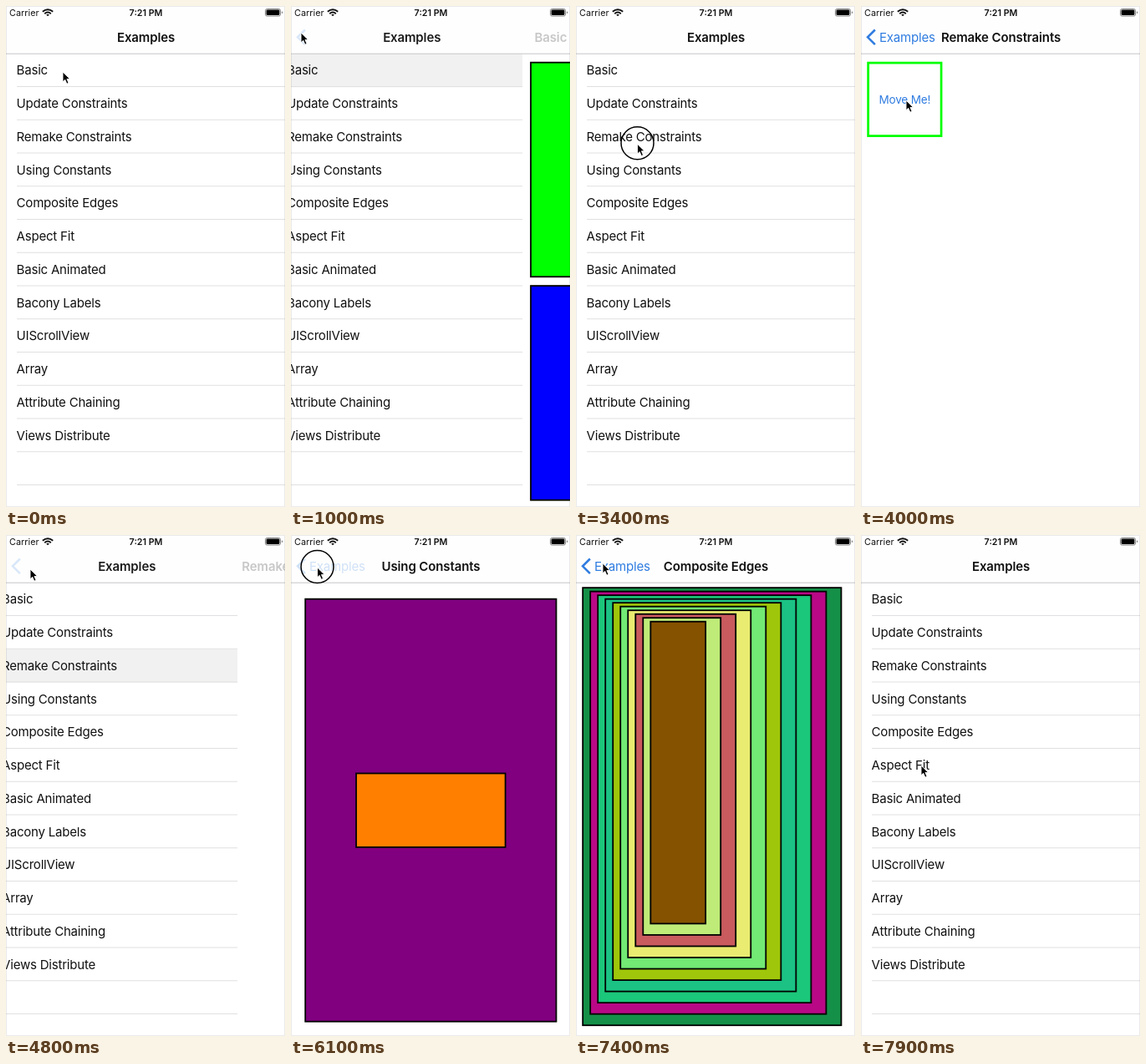
Recreate the animation shown at these times as an HTML page. Size 334 by 600 pixels, loop 8 s.

```html
<!DOCTYPE html>
<html lang="en">
<head>
<meta charset="utf-8">
<title>Examples</title>
<style>
  html, body { margin: 0; width: 100%; height: 100%; overflow: hidden; background: #fff; }
  svg { display: block; width: 334px; height: 600px; }
  text { font: 15px Inter, Roboto, sans-serif; letter-spacing: -.2px; fill: #111; }
  .title { font-weight: 600; letter-spacing: -.12px; }
  .status { font-size: 10.7px; letter-spacing: .1px; }
  .time { font-weight: 600; text-anchor: middle; letter-spacing: 0; }
  .tint { fill: #2f7ce0; }
  .button { text-anchor: middle; }
</style>
</head>
<body>
<svg viewBox="0 0 334 600">
  <rect width="334" height="600" fill="#fff"/>
  <g id="list"></g>
  <g id="stack"></g>

  <rect width="334" height="57" fill="#fefefe"/>
  <path d="M0 57.2H334" stroke="#c6c6c8"/>
  <g id="back">
    <path id="chevron" d="M16.8 28.5L8 37.3L16.8 46.1" fill="none" stroke="#2f7ce0" stroke-width="2.6"/>
    <text id="backLabel" class="tint" y="42.5">Examples</text>
  </g>
  <text id="rootTitle" class="title" y="42.5">Examples</text>
  <text id="pageTitle" class="title" y="42.5"></text>

  <text class="status" x="4" y="12">Carrier</text>
  <g fill="none" stroke="#111" stroke-width="1.9">
    <path d="M43.8 6.8Q50 1.6 56.2 6.8M46.2 9.2Q50 6 53.8 9.2"/>
    <path d="M48.2 10.4Q50 9 51.8 10.4L50 12.3Z" fill="#111" stroke="none"/>
  </g>
  <text class="status time" x="167.5" y="12">7:21 PM</text>
  <rect x="310.5" y="3.5" width="18" height="8.6" rx="2" fill="none" stroke="#777" stroke-width=".9"/>
  <rect x="311.6" y="4.6" width="15.8" height="6.4" rx="1.2" fill="#000"/>
  <path d="M330.2 6.3Q332.2 7.8 330.2 9.3Z" fill="#555"/>

  <rect x=".5" y=".5" width="333" height="599" fill="none" stroke="#000" stroke-opacity=".08"/>
  <g id="cursor">
    <circle id="ring" r="19.5" fill="none" stroke="#000" stroke-width="1.5"/>
    <path d="M0 1V12.8L2.7 10.3L4.8 15.2L7 14.2L4.9 9.5H8.6Z" stroke="#fff" stroke-width=".9"/>
  </g>
</svg>
<script>
const $ = id => document.getElementById(id);
const LOOP = 8000, SCALE = .902, LEFT = -1.8, WIDTH = 375 * SCALE;
const TOP = 57.5, ROW = 39.75, MID = 167.5;

const rows = ['Basic', 'Update Constraints', 'Remake Constraints', 'Using Constants',
  'Composite Edges', 'Aspect Fit', 'Basic Animated', 'Bacony Labels', 'UIScrollView',
  'Array', 'Attribute Chaining', 'Views Distribute'];

// Each visit opens the row with the same index: [push time, pop time].
const visits = [[200, 825], [1400, 2850], [3480, 4625], [5280, 6150], [6680, 7450]];
const growTaps = [1850, 2010, 2170, 2330, 2490];
const moveTap = 4100;
const presses = [[100, 200], [740, 825], [1310, 1400], ...growTaps.map(t => [t - 80, t]),
  [2765, 2850], [3370, 3480], [4010, 4100], [4540, 4625], [5190, 5280],
  [6060, 6150], [6590, 6680], [7410, 7450]];

// Pointer stops: arrival, departure, x, y.
const stops = [[0, 250, 68, 78], [700, 1010, 12, 31], [1300, 1440, 70, 120],
  [1760, 2540, 167, 330], [2760, 2930, 30, 36], [3320, 3560, 73.5, 164.3],
  [3950, 4160, 54, 112], [4500, 4810, 29, 40], [5160, 5360, 74, 200],
  [5980, 6220, 31.5, 38], [6560, 6760, 74, 240], [7150, 7500, 32, 33], [7850, 8000, 72, 275]];

const clamp = v => Math.min(1, Math.max(0, v));
const smooth = v => (v = clamp(v), v * v * (3 - 2 * v));
const mix = (a, b, k) => a + (b - a) * k;
const spring = ms => {
  const x = Math.max(0, ms) * .018, rest = (1 + x) * Math.exp(-x);
  return rest < .005 ? 1 : 1 - rest;
};

// Page shapes are in points; a border lies inside its box.
const box = (l, t, r, b, fill, stroke = '#000', w = 2) =>
  `<rect x="${l + w / 2}" y="${t + w / 2}" width="${r - l - w}" height="${b - t - w}"
    fill="${fill}" stroke="${stroke}" stroke-width="${w}"/>`;
const button = (cx, cy, size, label) =>
  box(cx - size / 2, cy - size / 2, cx + size / 2, cy + size / 2, 'none', '#0f0', 3) +
  `<text class="button tint" x="${cx}" y="${cy + 5.5}">${label}</text>`;

const nested = ['#159048', '#b90886', '#1bc77a', '#1bc284', '#9fc60a',
  '#72ea74', '#e9ec70', '#c95a5e', '#bfec78', '#855200'];

const pages = [
  () => box(10, 74, 182.5, 360.5, '#0f0') + box(192.5, 74, 365, 360.5, '#f00') +
    box(10, 370.5, 365, 657, '#00f'),
  t => button(187.5, 365.5,
    growTaps.reduce((s, tap) => s * (1 + .3 * smooth((t - tap) / 400)), 100), 'Grow Me!'),
  t => {
    const k = smooth((t - moveTap) / 400);
    return button(mix(60, 315, k), mix(124, 607, k), 100, 'Move Me!');
  },
  () => box(20, 84, 355, 647, '#800080') + box(87.5, 315.5, 287.5, 415.5, '#ff8000'),
  () => nested.map((c, i) => {
    const n = i + 1;
    return box(10 * n, 64 + 5 * n, 375 - 20 * n, 667 - 15 * n, c);
  }).join('')
];

$('list').innerHTML = `<rect id="mark" width="${WIDTH}" height="${ROW}" x="${LEFT}" fill="#d9d9d9"/>` +
  Array.from({ length: 13 }, (_, i) => {
    const y = TOP + ROW * i;
    return `<path d="M13 ${y + 39}H${LEFT + WIDTH + 100}" stroke="#e0e0e2"/><text x="12.6" y="${y + 24.8}">${rows[i] || ''}</text>`;
  }).join('');

function pointer(t) {
  const i = stops.findLastIndex(s => s[0] <= t), a = stops[i], b = stops[i + 1];
  const k = b ? smooth((t - a[1]) / (b[0] - a[1])) : 0;
  return b ? [mix(a[2], b[2], k), mix(a[3], b[3], k)] : [a[2], a[3]];
}

function place(el, x, alpha) {
  el.setAttribute('x', x);
  el.setAttribute('opacity', alpha);
}

function draw(t) {
  const n = visits.findLastIndex(v => v[0] <= t);
  const [start, end] = visits[n] || [0, 0];
  const popping = t >= end;
  const q = n < 0 ? 0 : popping ? 1 - spring(t - end) : spring(t - start);

  $('list').setAttribute('transform', `translate(${-100 * q})`);
  $('mark').setAttribute('y', TOP + ROW * n);
  $('mark').setAttribute('opacity', n < 0 ? 0 : popping ? Math.sqrt(q) * .9 : 1);

  const x = LEFT + WIDTH * (1 - q);
  $('stack').innerHTML = q > 0
    ? `<g transform="translate(${x}) scale(${SCALE})"><rect y="63" width="376" height="605" fill="#fff"/>${pages[n](t)}</g>`
    : '';

  const [px, py] = pointer(t);
  const pressed = presses.some(([a, b]) => t >= a && t < b);
  $('cursor').setAttribute('transform', `translate(${px} ${py})`);
  $('ring').setAttribute('opacity', +pressed);

  const root = $('rootTitle'), title = $('pageTitle');
  const rootX = MID - root.getComputedTextLength() / 2;
  place(root, mix(rootX, 3, q), clamp(1.2 - 1.4 * q));
  place($('backLabel'), mix(rootX, 22, q), clamp(q * 1.4 - .4));
  $('chevron').setAttribute('opacity', q);
  $('back').setAttribute('opacity', pressed && py < TOP ? .22 : 1);

  title.textContent = n < 0 ? '' : rows[n];
  place(title, mix(322, MID - title.getComputedTextLength() / 2, q), clamp(1.3 * q));
}

function tick(now) {
  draw(now % LOOP);
  requestAnimationFrame(tick);
}
draw(0);
requestAnimationFrame(tick);
</script>
</body>
</html>
```
